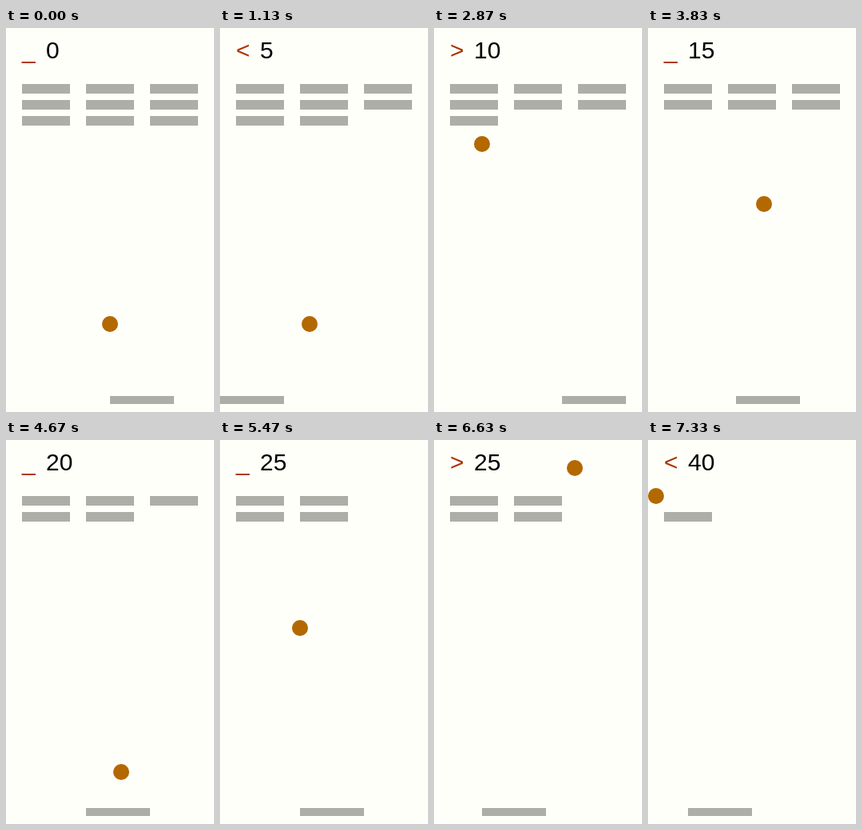
An HTML page with a canvas for the animation above (7.36 s loop, 260 by 480 pixels).

```html
<!DOCTYPE html>
<html lang="en">
<head>
<meta charset="utf-8">
<title>Brick breaker</title>
<style>
html, body { margin: 0; width: 260px; height: 480px; overflow: hidden; background: #fffffa; }
canvas { display: block; }
</style>
</head>
<body>
<canvas id="stage" width="260" height="480"></canvas>
<script>
const ctx = document.getElementById('stage').getContext('2d');
const LOOP = 7360;

// Each path lists the corners of a motion as [tick, value]
const ballX = [[0, 130], [6, 148], [23, 250], [51, 82], [95, 122.5], [131, 10], [139, 35.2],
  [168.3, 250], [185, 128], [200.25, 250], [230.25, 10], [234, 40], [257.7, 250], [266, 176], [294, 10]];
const ballY = [[0, 370], [6, 460], [29, 115], [51, 445], [73, 115], [95, 445], [117, 115],
  [139, 445], [162, 100], [185, 445], [209, 85], [234, 460], [264.17, 7.5], [268, 65],
  [271.83, 7.5], [277, 85], [282.17, 7.5], [286, 65], [289.83, 7.5], [294, 70]];
const paddleX = [[0, 130], [33, 130], [46, 0], [55, 0], [66, 110], [110, 110], [117, 180],
  [122, 180], [136, 40], [143, 40], [150, 110], [158, 110], [168, 10], [172, 10], [181, 100],
  [222, 100], [230, 20], [262, 20], [268, 80], [291, 80], [294, 50]];

// Bricks in the order they are hit: [tick, column, row]
const hits = [[29, 2, 2], [73, 1, 2], [117, 0, 2], [162, 2, 1],
  [209, 2, 0], [268, 1, 0], [277, 1, 1], [286, 0, 0], [Infinity, 0, 1]];

function at(path, tick) {
  const i = path.findIndex(p => p[0] >= tick);
  if (i < 0) return path[path.length - 1][1];
  if (i === 0) return path[0][1];
  const [t0, a] = path[i - 1], [t1, b] = path[i];
  return a + (b - a) * (tick - t0) / (t1 - t0);
}

function rect(color, x, y, w, h) {
  ctx.fillStyle = color;
  ctx.fillRect(x, y, w, h);
}

function text(color, value, x) {
  ctx.fillStyle = color;
  ctx.fillText(value, x, 38);
}

function draw(tick) {
  rect('#fffffa', 0, 0, 260, 480);

  const left = hits.filter(h => h[0] > tick);
  for (const [, col, row] of left) rect('#aeaea9', 20 + col * 80, 70 + row * 20, 60, 12);

  const paddle = Math.round(at(paddleX, tick));
  const step = paddle - Math.round(at(paddleX, tick - 1));
  rect('#aeaea9', paddle, 460, 80, 10);

  ctx.fillStyle = '#b36800';
  ctx.beginPath();
  ctx.arc(Math.round(at(ballX, tick)), Math.round(at(ballY, tick)), 10, 0, 7);
  ctx.fill();

  ctx.font = '30px "Liberation Sans", Arial, sans-serif';
  text('#aa3300', step < 0 ? '<' : step > 0 ? '>' : '_', 20);
  text('#000', (hits.length - left.length) * 5, 50);
}

// The game ticks 40 times a second and is shown 30 times a second
const start = performance.now();
function frame() {
  const time = (performance.now() - start) % LOOP;
  const shown = Math.min(220, Math.floor((time + 4) * 0.03));
  draw(Math.floor(shown * 4 / 3 + 0.8));
  requestAnimationFrame(frame);
}
frame();
</script>
</body>
</html>
```
